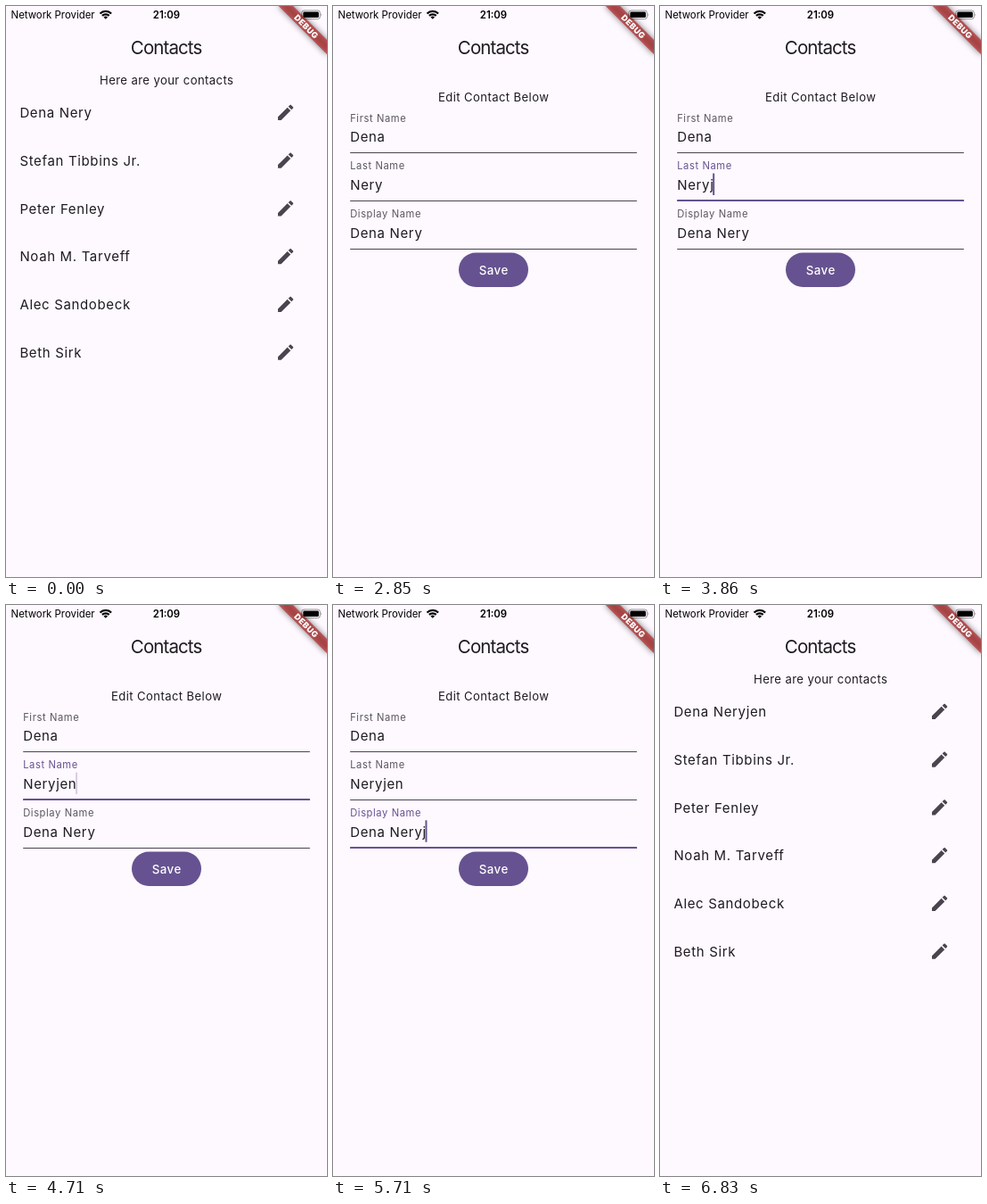
An HTML page for the animation above (9440 ms loop, 360 by 640 pixels).

```html
<!DOCTYPE html>
<html lang="en">
<head>
<meta charset="utf-8">
<title>Contacts</title>
<style>
  html, body { margin: 0; width: 100%; height: 100%; overflow: hidden; background: #fef8ff; }
  svg { display: block; font-family: Inter, "Liberation Sans", sans-serif; font-optical-sizing: none; fill: #1d1b20; }
  .mid { text-anchor: middle; }
  .title { font-size: 20.5px; letter-spacing: -.9px; }
  .sub { font-size: 13.1px; letter-spacing: .4px; }
  .body { font-size: 15px; letter-spacing: .65px; }
  .label { font-size: 11.2px; letter-spacing: .58px; }
  .save { font-size: 13.3px; font-weight: 500; letter-spacing: .5px; fill: #fff; }
  .status { font-size: 11.4px; fill: #000; }
  .debug { font-size: 9.6px; font-weight: 900; letter-spacing: .4px; fill: #fff; }
  .shade { fill: #000; opacity: .5; filter: blur(3.8px); }
  .icon, .line { fill: #49454f; }
  .accent { fill: #665290; }
</style>
</head>
<body>
<svg width="360" height="640" viewBox="0 0 360 640">
  <text class="title mid" x="179.6" y="54.3">Contacts</text>
  <g id="list"><text class="sub mid" x="180.2" y="87.5">Here are your contacts</text></g>
  <g id="form">
    <text class="sub mid" x="180.2" y="106.5">Edit Contact Below</text>
    <rect class="accent" x="141" y="276.5" width="78" height="38.4" rx="19.2"/>
    <text class="save mid" x="180.2" y="300.6">Save</text>
  </g>
  <g transform="translate(360 0) rotate(45) scale(.96)">
    <rect class="shade" x="-40" y="28" width="80" height="12"/>
    <rect x="-40" y="28" width="80" height="12" fill="#b71c1c" fill-opacity=".63"/>
    <text class="debug mid" x="0" y="37.6">DEBUG</text>
  </g>
  <text class="status" x="5.6" y="13.9">Network Provider</text>
  <text class="status mid" x="180" y="13.9" font-weight="600">21:09</text>
  <g transform="translate(111.8 14.8)" fill="none" stroke="#000" stroke-width="2.2">
    <path d="M-6.3-6.3A8.9 8.9 0 0 1 6.3-6.3M-3.9-3.9A5.5 5.5 0 0 1 3.9-3.9"/>
    <path d="M0 0L-2.3-2.3A3.3 3.3 0 0 1 2.3-2.3Z" fill="#000" stroke="none"/>
  </g>
  <rect x="331.7" y="5" width="20.6" height="9.6" rx="2.7" fill="none" stroke="#000" stroke-opacity=".4"/>
  <rect x="333.3" y="6.5" width="17.5" height="6.6" rx="1.4" fill="#000"/>
  <path d="M353.4 8.2q1.6 1.6 0 3.2z" fill-opacity=".45"/>
</svg>
<script>
const LOOP = 9440, ROW = 53.76, STEP = 110;
const OPEN = 2850, FOCUS_LAST = 2960, FOCUS_DISPLAY = 4830, CLOSE = 6830;
const SUFFIX = 'jen';
const PENCIL = 'M3 17.25V21h3.75L17.81 9.94l-3.75-3.75L3 17.25zM20.71 7.04c.39-.39.39-1.02 0-1.41l-2.34-2.34c-.39-.39-1.02-.39-1.41 0l-1.83 1.83 3.75 3.75 1.83-1.83z';
const people = ['Dena Nery', 'Stefan Tibbins Jr.', 'Peter Fenley', 'Noah M. Tarveff', 'Alec Sandobeck', 'Beth Sirk'];
const lastKeys = [3860, 3960, 4080], displayKeys = [5710, 5810, 5930];
// [time, opacity] of the text cursor
const blink = [[0, 0], [3070, 1], [3520, .4], [3640, 0], [3860, 1], [4710, .25], [4830, 0],
  [4940, 1], [5480, .4], [5600, 0], [5710, 1], [6480, .4], [6590, 0]];

const list = document.getElementById('list');
const form = document.getElementById('form');

function add(parent, tag, attrs, text = '') {
  const el = document.createElementNS('http://www.w3.org/2000/svg', tag);
  for (const key in attrs) el.setAttribute(key, attrs[key]);
  el.textContent = text;
  return parent.appendChild(el);
}

const names = people.map((name, i) => {
  const y = i * ROW;
  add(list, 'path', { class: 'icon', d: PENCIL, transform: `translate(302.1 ${107.8 + y}) scale(.96)` });
  return add(list, 'text', { class: 'body', x: 15.4, y: 125 + y }, name);
});

const [first, last] = people[0].split(' ');
const fields = [['First Name', first], ['Last Name', last], ['Display Name', people[0]]].map(([label, value], i) => {
  const y = i * ROW, bottom = Math.round(164.1 + y);
  add(form, 'rect', { class: 'line', x: 19.2, y: bottom, width: 321.6, height: 1 });
  return {
    value,
    base: 152 + y,
    line: add(form, 'rect', { class: 'accent', x: 19.2, y: bottom - 1, width: 321.6, height: 2 }),
    label: add(form, 'text', { class: 'label', x: 19.2, y: 129.5 + y }, label),
    text: add(form, 'text', { class: 'body', x: 19.2, y: 152 + y }, value)
  };
});
const caret = add(form, 'rect', { class: 'accent', width: 2, height: 24.4 });

const typed = (keys, t) => SUFFIX.slice(0, keys.filter(k => t >= k).length);
const ramp = (t, start) => Math.min(1, Math.max(0, (Math.floor((t - start) / STEP) + 1) / 3));

function draw(t) {
  const editing = t >= OPEN && t < CLOSE;
  list.style.display = editing ? 'none' : '';
  form.style.display = editing ? '' : 'none';
  names[0].textContent = people[0] + (t >= CLOSE ? SUFFIX : '');
  if (!editing) return;

  const toDisplay = ramp(t, FOCUS_DISPLAY);
  const focus = [0, ramp(t, FOCUS_LAST) - toDisplay, toDisplay];
  const tails = ['', typed(lastKeys, t), typed(displayKeys, t)];
  fields.forEach((f, i) => {
    f.text.textContent = f.value + tails[i];
    f.line.style.opacity = focus[i];
    f.label.style.fill = `color-mix(in srgb, #665290 ${focus[i] * 100}%, #5a5660)`;
  });

  const active = fields[t < FOCUS_DISPLAY ? 1 : 2];
  caret.setAttribute('x', 17.9 + active.text.getComputedTextLength());
  caret.setAttribute('y', active.base - 18.2);
  caret.style.opacity = blink.filter(b => t >= b[0]).pop()[1];
}

const start = performance.now();
function frame() {
  draw((performance.now() - start) % LOOP);
  requestAnimationFrame(frame);
}
frame();
</script>
</body>
</html>
```
